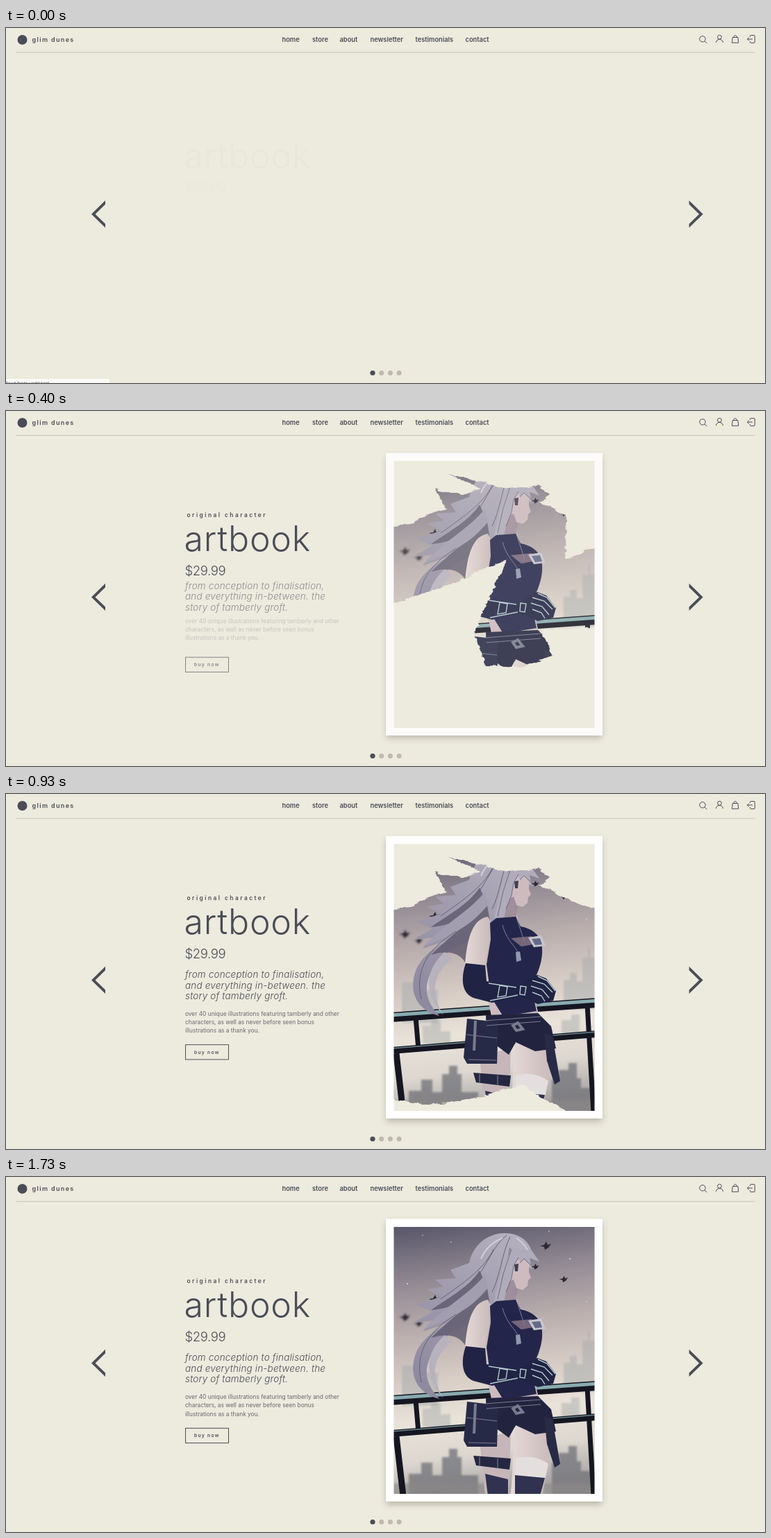
An HTML page for the animation above (4.73 s loop, 1093x512 px).

```html
<!DOCTYPE html>
<html lang="en">
<head>
<meta charset="utf-8">
<title>artbook carousel</title>
<style>
html, body { margin: 0; width: 100%; height: 100%; overflow: hidden; background: #edeade; }
svg { display: block; width: 100%; height: 100%; }
text { font-family: Inter, "Open Sans", sans-serif; fill: #4a4d57; }
.nav text { font-size: 9.3px; font-weight: 600; }
.brand { font-size: 9px; font-weight: 600; letter-spacing: 1.35px; }
.kicker { font-size: 8.3px; font-weight: 600; letter-spacing: 2.5px; }
.title { font-size: 50px; font-weight: 300; letter-spacing: .8px; }
.price { font-size: 18.5px; font-weight: 300; letter-spacing: -.4px; }
.tag text { font-size: 13.5px; font-style: italic; font-weight: 300; letter-spacing: .18px; }
.body text { font-size: 8.35px; fill: #64666d; }
.buy text { font-size: 6.7px; font-weight: 600; letter-spacing: 1.3px; }
.line { fill: none; stroke: #4a4d57; }

.tag, .body, .buy, .card, .head, .kicker, .status, .brush, .sweep, .edge, .corner, .base, .top {
  animation: 4730ms linear infinite both;
}
.tag, .body, .buy, .card, .kicker, .head { animation-timing-function: cubic-bezier(.215, .61, .355, 1); }
.head { animation-name: head; }
.kicker { animation-name: kicker; }
.tag { animation-name: tag; }
.body { animation-name: body; }
.buy { animation-name: buy; }
.card { animation-name: card; }
.status { animation-name: status; animation-timing-function: step-end; }
.brush { animation-name: brush; }
.sweep { animation-name: sweep; }
.edge { animation-name: edge; }
.corner { animation-name: corner; }
.base { animation-name: base; }
.top { animation-name: top; }

@keyframes head { 0%, 1.2% { opacity: .02 } 8%, 100% { opacity: 1 } }
@keyframes kicker { 0%, .8% { opacity: 0 } 8%, 100% { opacity: 1 } }
@keyframes tag {
  0%, 4.44% { opacity: 0; transform: translateY(-20px) }
  21.35%, 100% { opacity: 1; transform: none }
}
@keyframes body {
  0%, 6.77% { opacity: 0; transform: translateY(-20px) }
  23.68%, 100% { opacity: 1; transform: none }
}
@keyframes buy {
  0%, 1.27% { opacity: 0; transform: translateY(-20px) }
  27.3%, 100% { opacity: 1; transform: none }
}
@keyframes card { 0%, 1.2% { opacity: 0 } 16.5%, 100% { opacity: 1 } }
@keyframes status { 0% { opacity: 1 } 1.27%, 100% { opacity: 0 } }

/* picture reveal */
@keyframes sweep { 0%, 1.27% { transform: translateX(-240px) } 5.5%, 100% { transform: none } }
@keyframes brush {
  0%, 5.5% { d: path("M550,60L790,60 784,125 774,140 765,150 755,165 745,178 730,195 715,205 700,222 690,232 668,238 625,256 550,281Z") }
  8.46% { d: path("M550,60L800,60 807,150 806,215 860,190 860,312 772,315 787,352 745,369 690,367 674,320 722,213 640,250 550,279Z") }
  13.95% { d: path("M550,60L860,60 860,100 860,150 860,200 860,470 842,455 815,395 790,358 745,372 690,371 640,369 600,362 550,343Z") }
  19.66%, 100% { d: path("M550,60L860,60 860,100 860,150 860,200 860,470 830,468 812,459 770,437 742,419 700,432 640,445 600,448 550,440Z") }
}
@keyframes edge { 0%, 3.8% { transform: translateX(16px) } 5.5%, 100% { transform: none } }
@keyframes base { 0%, 19.66% { transform: translateX(310px) } 23.9%, 100% { transform: none } }
@keyframes corner { 0%, 19.66% { transform: translateX(-110px) } 23.9%, 100% { transform: none } }
@keyframes top { 0%, 23.9% { transform: translateX(-320px) } 31%, 100% { transform: none } }
</style>
</head>
<body>
<svg viewBox="0 0 1093 512" preserveAspectRatio="none">
  <defs>
    <linearGradient id="sky" x1=".2" y1="0" x2=".3" y2="1">
      <stop offset="0" stop-color="#5d5a6d"/>
      <stop offset=".2" stop-color="#928a93"/>
      <stop offset=".38" stop-color="#b9adad"/>
      <stop offset=".58" stop-color="#d9cfc7"/>
      <stop offset=".72" stop-color="#e9e3da"/>
      <stop offset=".86" stop-color="#dcd7cf"/>
      <stop offset="1" stop-color="#a9a6a5"/>
    </linearGradient>
    <linearGradient id="hair" x1=".8" y1="0" x2=".3" y2="1">
      <stop offset="0" stop-color="#b4b0be"/>
      <stop offset=".5" stop-color="#a09bad"/>
      <stop offset="1" stop-color="#8f8a9f"/>
    </linearGradient>
    <linearGradient id="skin" x1="0" y1="0" x2="1" y2="0">
      <stop offset="0" stop-color="#e5dad7"/>
      <stop offset="1" stop-color="#c9b8ba"/>
    </linearGradient>
    <filter id="rough" filterUnits="userSpaceOnUse" x="540" y="50" width="330" height="430" color-interpolation-filters="sRGB">
      <feTurbulence type="fractalNoise" baseFrequency=".05 .14" numOctaves="3" seed="4"/>
      <feDisplacementMap in="SourceGraphic" scale="8" xChannelSelector="R" yChannelSelector="G"/>
    </filter>
    <filter id="soft" x="-30%" y="-30%" width="160%" height="160%"><feGaussianBlur stdDeviation="1.6"/></filter>
    <filter id="shade" x="-10%" y="-10%" width="120%" height="120%"><feGaussianBlur stdDeviation="5"/></filter>
    <clipPath id="pic"><rect x="558.5" y="72" width="289" height="385"/></clipPath>
    <clipPath id="crest">
      <path d="M540,170L558,166 582,163 604,150 634,142 617,112 655,122 684,112 638,91 722,112 768,107 783,121 768,132 802,148 826,159 870,171V480H540Z"/>
    </clipPath>
    <mask id="reveal" maskUnits="userSpaceOnUse" x="540" y="50" width="330" height="430">
      <g fill="#fff" filter="url(#rough)">
        <g clip-path="url(#crest)">
          <g class="sweep"><path class="brush" d="M550,60H790L784,125 550,281Z"/></g>
          <ellipse class="edge" cx="851" cy="263" rx="14" ry="32"/>
        </g>
        <path class="corner" d="M545,88L580,88 606,96 622,116 660,122 640,150 545,180Z"/>
        <path class="base" d="M545,405H860V475H545Z"/>
        <path class="top" d="M540,55H865V180H540Z"/>
      </g>
    </mask>
    <path id="bird" d="M-8,-1L-2,-2 1,-7 3,-2 8,-4 4,2 -1,5 -2,1Z"/>
  </defs>

  <rect width="1093" height="512" fill="#edeade"/>

  <circle cx="23.5" cy="17" r="7" fill="#4a4d57"/>
  <text class="brand" x="37.5" y="20">glim dunes</text>
  <g class="nav">
    <text x="397.5" y="20">home</text>
    <text x="441" y="20">store</text>
    <text x="480.5" y="20">about</text>
    <text x="524.5" y="20">newsletter</text>
    <text x="589.5" y="20">testimonials</text>
    <text x="661.5" y="20">contact</text>
  </g>
  <g class="line">
    <circle cx="1003" cy="15.8" r="4.2"/>
    <path d="M1006,19L1009.3,22"/>
    <circle cx="1027.5" cy="13.2" r="2.9"/>
    <path d="M1022.5,21C1022.500,15 1032.500,15 1032.500,21"/>
    <path d="M1046.300,13.500H1054L1054.800,21.300H1045.500ZM1048,13.500C1048,9.500 1052.300,9.500 1052.300,13.500"/>
    <path d="M1071.500,13V11.500Q1071.500,10.500 1072.500,10.500H1077Q1078.300,10.500 1078.300,12V20Q1078.300,21.500 1077,21.500H1072.500Q1071.500,21.500 1071.500,20.500V19M1075,16H1067.500M1070,13.600L1067.500,16 1070,18.400"/>
  </g>
  <path d="M14,35.200H1079" stroke="#c6c4b9"/>

  <g fill="#4a4d55">
    <path d="M143,248.700V254.200L128.500,268.500 143,282.500V288L123,268.500Z"/>
    <path d="M983.700,248.700V254.200L998.200,268.500 983.700,282.500V288L1003.700,268.500Z"/>
    <circle cx="528" cy="497.500" r="3.600"/>
  </g>
  <g fill="#c0b9ae">
    <circle cx="540.700" cy="497.500" r="3.500"/>
    <circle cx="553.400" cy="497.500" r="3.500"/>
    <circle cx="566.100" cy="497.500" r="3.500"/>
  </g>

  <text class="kicker" x="260.500" y="153">original character</text>
  <g class="head">
    <text class="title" x="256.500" y="202">artbook</text>
    <text class="price" x="257.500" y="236.500">$29.99</text>
  </g>
  <g class="tag">
    <text x="258" y="265">from conception to finalisation,</text>
    <text x="258" y="280.700">and everything in-between. the</text>
    <text x="258" y="296.400">story of tamberly groft.</text>
  </g>
  <g class="body">
    <text x="258" y="320.200">over 40 unique illustrations featuring tamberly and other</text>
    <text x="258" y="332.400">characters, as well as never before seen bonus</text>
    <text x="258" y="344.600">illustrations as a thank you.</text>
  </g>
  <g class="buy">
    <rect class="line" x="258.500" y="362.300" width="62" height="21.300"/>
    <text x="271" y="375.300">buy now</text>
  </g>

  <g class="card">
    <rect x="548" y="66" width="310" height="406" fill="#8a867a" opacity=".55" filter="url(#shade)"/>
    <rect x="547" y="60.500" width="312" height="407.500" fill="#fff"/>
    <rect x="558.500" y="72" width="289" height="385" fill="#edeade"/>
    <g clip-path="url(#pic)"><g mask="url(#reveal)">
      <rect x="558" y="72" width="290" height="386" fill="url(#sky)"/>

      <!-- city -->
      <g filter="url(#soft)">
        <path d="M803,310V268H812V258H822V270H830V236H838V222H841V236H848V310ZM570,320V272H590V262H602V282H622V330H570Z" fill="#a5aaab" opacity=".5"/>
        <path d="M600,360V334H612V326H626V342H640V362ZM800,345V326H814V318H826V345Z" fill="#a9adac" opacity=".5"/>
        <path d="M580,460V428H598V412H614V430H628V404H638V392H650V404H656V430H680V460ZM786,460V412H796V398H810V388H822V410H828V424H848V460Z" fill="#77767c" opacity=".8"/>
        <path d="M558,442H700V460H558ZM775,442H848V460H775Z" fill="#8b8988" opacity=".6"/>
      </g>

      <!-- birds and stars -->
      <g fill="#2a2935">
        <use href="#bird" x="777" y="100"/>
        <use href="#bird" transform="translate(803 148) scale(.8)"/>
        <use href="#bird" transform="translate(762 130) scale(.7)"/>
        <use href="#bird" x="617" y="177"/>
        <g filter="url(#soft)">
          <use href="#bird" x="574" y="203"/>
          <use href="#bird" transform="translate(594 212) scale(.8)"/>
        </g>
      </g>
      <g fill="#e6dfe2">
        <circle cx="578" cy="154" r="1"/><circle cx="641" cy="94" r=".8"/><circle cx="812" cy="118" r=".9"/>
        <circle cx="782" cy="78" r=".8"/><circle cx="836" cy="180" r=".8"/><circle cx="600" cy="84" r=".7"/>
      </g>

      <!-- railing -->
      <g fill="none" stroke="#151621">
        <path d="M556,322L850,301" stroke-width="14"/>
        <path d="M556,370L850,346" stroke-width="10"/>
        <path d="M590,322L594,369M837,303L846,460" stroke-width="7"/>
        <path d="M562,374L572,460" stroke-width="9"/>
        <path d="M556,319L850,298" stroke="#88abb0" stroke-width="5"/>
        <path d="M556,367L850,343" stroke="#68858c" stroke-width="1.500"/>
      </g>

      <!-- hair -->
      <path d="M716,81C738,80 753,92 757,107L768,122 752,116 758,134 742,120 728,144 722,166 711,182 717,207 704,182 690,188C680,212 640,218 622,242C602,268 598,292 624,320C592,312 579,286 590,255C598,234 620,217 646,207L600,223 616,207 588,210 614,194 590,184 626,173 606,162 630,158 618,148 648,146 640,134 667,124C672,99 692,82 716,81Z" fill="url(#hair)"/>
      <path d="M692,155C674,180 645,200 612,232C640,224 656,230 664,248C670,222 682,204 697,184ZM682,135C665,160 640,172 612,192C640,190 668,178 690,152Z" fill="#625d70" opacity=".85"/>
      <path d="M690,140C672,166 640,180 600,221C640,204 668,192 694,160Z" fill="#a39eaf"/>
      <path d="M632,228C604,252 600,286 630,319C612,290 612,262 642,238Z" fill="#b8b2bf"/>
      <g fill="none" stroke="#5f5b70" stroke-width=".9">
        <path d="M721,84C700,100 694,128 672,152M726,86C714,110 712,142 700,166M702,104C690,130 666,148 626,176M726,102C722,122 716,138 712,178M648,198C610,222 588,250 598,296"/>
      </g>
      <path d="M715,88C700,94 690,104 684,118M735,88C747,96 752,104 754,114" fill="none" stroke="#d2ced6" stroke-width="2"/>

      <!-- head and shoulder -->
      <path d="M730,124L742,116 754,120 753,137 756,145 752,149 751,157 744,163 734,160 737,182 712,181 718,160Z" fill="#cdbbbf"/>
      <path d="M731,148L736,163 735,181 712,181 721,152Z" fill="#8b7b8b" opacity=".7"/>
      <path d="M732,126L738,125 737,136 733,136Z" fill="#403e55"/>
      <path d="M728,102L757,106 768,122 754,115 756,128 746,118 740,124 738,116 731,128 728,146 720,166 717,180 710,184 714,206 703,178 712,140Z" fill="#b0abba"/>
      <path d="M738,116L731,128 728,146 720,166M757,128L746,118 740,124M728,104L716,140 708,176" fill="none" stroke="#5f5b70" stroke-width=".8"/>
      <path d="M694,177C673,180 664,205 661,247L689,249C692,228 700,210 699,186Z" fill="url(#skin)"/>

      <!-- body -->
      <path d="M693,292L700,325 768,322 760,290Z" fill="#cdbbc0"/>
      <path d="M706,179L734,177 741,191C757,194 768,202 771,216C775,233 768,255 760,269L758,286 764,313 716,321 698,292 692,246 698,210 697,186Z" fill="#23264a"/>
      <path d="M727,208L757,205 764,216 742,220Z" fill="#77667a"/>
      <path d="M715,189C722,215 738,222 737,232M736,181L747,214" fill="none" stroke="#77819e"/>
      <path d="M752,207L771,204 777,219 760,221Z" fill="#c8c6ce"/>
      <path d="M757,209L769,208 772,217 762,218Z" fill="#636b88"/>
      <path d="M734,228L740,227 742,240 735,242Z" fill="#8f98ad"/>

      <!-- legs -->
      <path d="M682,380L727,366 724,460H690Z" fill="#c6b6b9"/>
      <path d="M734,355L788,362C788,395 778,430 771,460H726C732,425 727,390 734,355Z" fill="url(#skin)"/>
      <path d="M734,406C750,400 770,405 781,414L776,435 733,430Z" fill="#e4dfde"/>
      <path d="M733,430L776,434 769,460H733ZM690,428L723,436V460H694Z" fill="#30324f"/>
      <path d="M673,402L727,406 725,422 677,416Z" fill="#252741"/>
      <path d="M691,319L766,316 785,335 792,367 762,371 734,358 724,376 692,352Z" fill="#22243f"/>
      <path d="M664,324L709,329 707,389 664,389 659,380Z" fill="#272a47"/>
      <path d="M775,345L787,350 798,414 790,419 779,385Z" fill="#282b46"/>
      <g fill="none" stroke="#777b8e">
        <path d="M663,347L707,352M666,383L706,384M690,327L770,321M692,334L770,328M682,404V416M708,406V420" stroke-width="1.200"/>
        <path d="M676,327L674,370M730,334L737,330 744,339 735,341Z" stroke-width="4"/>
      </g>

      <!-- gloves -->
      <path d="M662,244L690,247 692,270 738,278 752,268 765,261 778,266 792,284 788,298 766,303 739,292 700,301 673,294C654,286 656,262 662,244Z" fill="#202343"/>
      <g fill="none" stroke="#b4cbd2" stroke-width="1.400">
        <path d="M695,273L735,279M697,298L737,290M711,276L722,278 720,291 708,293ZM741,277L749,278 747,290 740,289Z"/>
        <path d="M758,269L775,274 787,286M756,277L772,282 782,294M758,286L771,291 776,299M766,263L779,269 791,284"/>
      </g>
    </g></g>
  </g>

  <g class="status">
    <rect y="506" width="149" height="6" fill="#fbfaf8"/>
    <text x="-1" y="515" style="font: 6.500px 'Open Sans', sans-serif">Read fonts.vortil.test</text>
  </g>
</svg>
</body>
</html>
```
